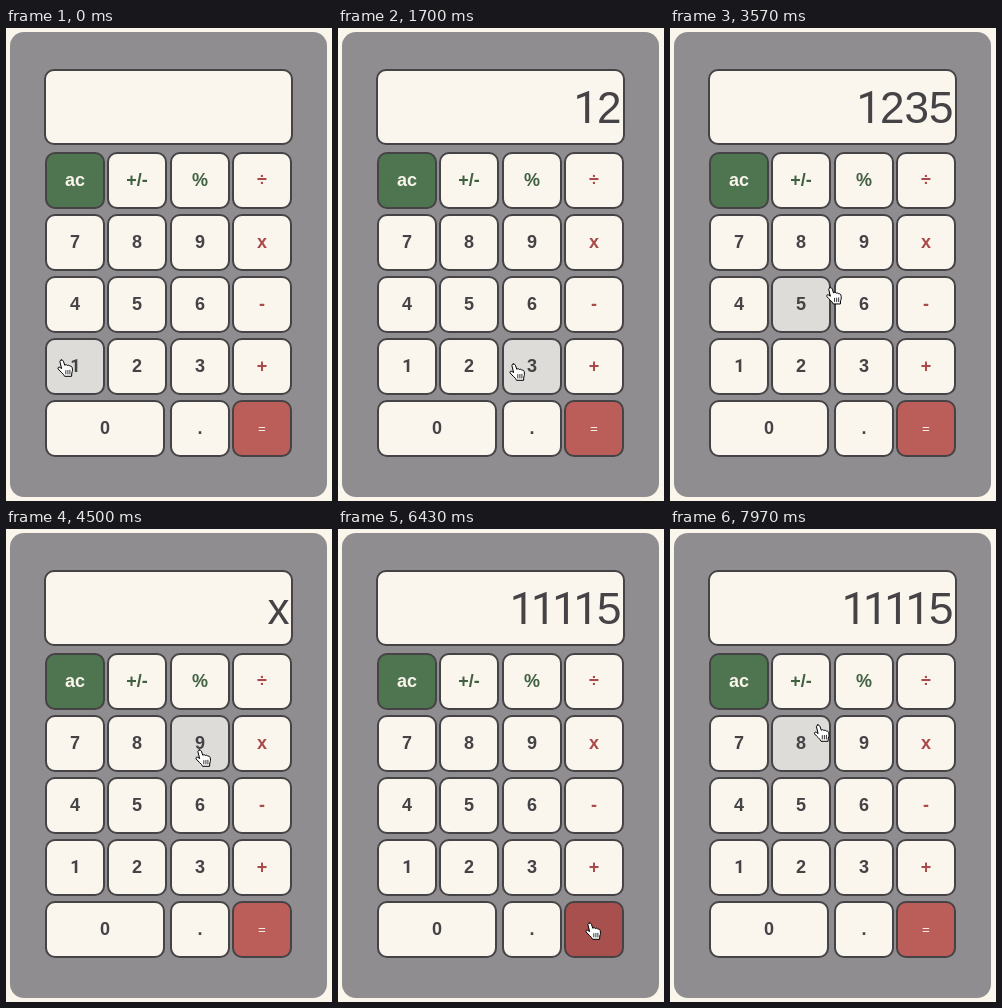
An HTML page for the animation above (8 s loop, 326 px wide and 473 px high).

```html
<!DOCTYPE html>
<html lang="en">
<head>
<meta charset="utf-8">
<title>Calculator</title>
<style>
  html, body { margin: 0; width: 100%; height: 100%; overflow: hidden; background: #faf6ec; }
  body { position: relative; font-family: "Liberation Sans", Arial, sans-serif; color: #454345; }
  div, svg { position: absolute; box-sizing: border-box; }
  #body { left: 4px; top: 4px; width: 317px; height: 465px; border-radius: 14px; background: #8f8d90; }
  #screen, .key { border: 2px solid #454345; border-radius: 10px; background: #faf5ed; white-space: nowrap; }
  #screen {
    left: 38px; top: 41px; width: 249px; height: 76px; padding-right: 1.5px;
    font-size: 44px; line-height: 74px; text-align: right;
  }
  .key { height: 57px; font-weight: bold; font-size: 18px; line-height: 53px; text-align: center; }
  .green { color: #3f6141; }
  .red { color: #a94a49; }
  .clear { background: #4e754f; color: #faf5ed; }
  .equals { background: #bb5d58; color: #faf5ed; font-weight: normal; font-size: 13.33px; }
  .hover { background: #dddcd8; }
  .down { background: #cfceca; }
  .equals.hover { background: #a8504d; }
  .equals.down { background: #9b4845; }
  /* plain figure one, without a foot */
  i { font-family: Roboto, sans-serif; font-style: normal; line-height: 0; margin: 0 -.0255em 0 .02em; }
  i + i { margin-left: -.054em; }
  #hand { left: 0; top: 0; width: 17px; height: 19px; overflow: visible; }
</style>
</head>
<body>
<div id="body"></div>
<div id="screen"></div>
<svg id="hand" viewBox="0 0 17 19" stroke="#000" stroke-linejoin="round" stroke-linecap="round">
  <path fill="#fff" d="M4.2 1C5.4.6 6.2 1.6 6.6 2.8L7.8 6.3C8.6 5.4 10 5.5 10.4 6.6C11.2 5.9 12.4 6.2 12.8 7.2
    C13.8 6.8 14.8 7.3 15.1 8.4C15.7 10.5 15.6 12 14.8 14L14.6 17.3H7.6C6.6 14.8 3.4 12.8 1.2 10
    C.4 8.8 1.6 7.6 2.8 8.3L4.6 9.6L3 3C2.7 2 3.2 1.3 4.2 1Z"/>
  <path fill="none" stroke-width=".8" d="M8.8 11.6V15M10.9 11.4V15M12.9 11.2V15"/>
</svg>
<script>
const LOOP = 8000;
const screen_ = document.getElementById('screen');
const hand = document.getElementById('hand');
const columns = [39, 101, 164, 226];
const rows = ['ac +/- % ÷', '7 8 9 x', '4 5 6 -', '1 2 3 +', '0 _ . ='];
const styles = { ac: 'clear', '+/-': 'green', '%': 'green', '÷': 'red', x: 'red', '-': 'red', '+': 'red', '=': 'equals' };

const markup = text => text.replace(/1/g, '<i>1</i>');

const keys = [];
rows.forEach((row, r) => row.split(' ').forEach((label, c) => {
  if (label === '_') return;
  const el = document.createElement('div');
  const x = columns[c], y = 124 + 62 * r, w = label === '0' ? 120 : 60;
  const base = 'key ' + (styles[label] || '');
  el.style.cssText = `left:${x}px;top:${y}px;width:${w}px`;
  el.innerHTML = markup(label);
  document.body.insertBefore(el, hand);
  keys.push({ el, x, y, w, base });
}));

// time, x, y of the pointer; a repeated place is a rest
const path = [
  [0, 51, 331], [480, 51, 331],
  [870, 114, 334], [1300, 114, 334],
  [1700, 171, 335], [2300, 171, 335],
  [2800, 123, 276], [3400, 123, 276],
  [3900, 244, 212], [4170, 244, 212],
  [4500, 189, 220], [4750, 189, 220],
  [5000, 216, 306], [5430, 243, 382],
  [5830, 247, 393], [7000, 247, 393],
  [7830, 150, 226], [7970, 143.5, 195], [LOOP, 143.5, 195]
];

// press time, release time, reading after release
const presses = [
  [200, 300, '1'], [1100, 1200, '12'], [2000, 2130, '123'], [3100, 3200, '1235'],
  [3930, 4030, 'x'], [4600, 4700, '9'], [5830, 5870, '11115']
];

function slope(i, k) {
  const a = path[i - 1], p = path[i], b = path[i + 1];
  if (!a || !b || a[k] === p[k] || b[k] === p[k]) return 0;
  return (b[k] - a[k]) / (b[0] - a[0]);
}

function pointer(t) {
  const i = path.findIndex(p => p[0] > t) - 1;
  const p = path[i], q = path[i + 1], d = q[0] - p[0], u = (t - p[0]) / d;
  const s = u * u * (3 - 2 * u);
  return [1, 2].map(k => p[k] + (q[k] - p[k]) * s +
    d * u * (1 - u) * (slope(i, k) * (1 - u) - slope(i + 1, k) * u));
}

let shown = '';
function draw(t) {
  const [x, y] = pointer(t);
  hand.style.transform = `translate(${x}px, ${y}px)`;

  const pressed = presses.some(p => t >= p[0] && t < p[1]);
  const tipX = x + 5, tipY = y + 1;
  for (const k of keys) {
    const over = tipX >= k.x && tipX < k.x + k.w && tipY >= k.y && tipY < k.y + 57;
    k.el.className = k.base + (over ? ' hover' + (pressed ? ' down' : '') : '');
  }

  const last = presses.filter(p => t >= p[1]).pop();
  const reading = last ? last[2] : '';
  if (reading !== shown) screen_.innerHTML = markup(shown = reading);
}

const start = performance.now();
function tick() {
  draw((performance.now() - start) % LOOP);
  requestAnimationFrame(tick);
}
tick();
</script>
</body>
</html>
```
